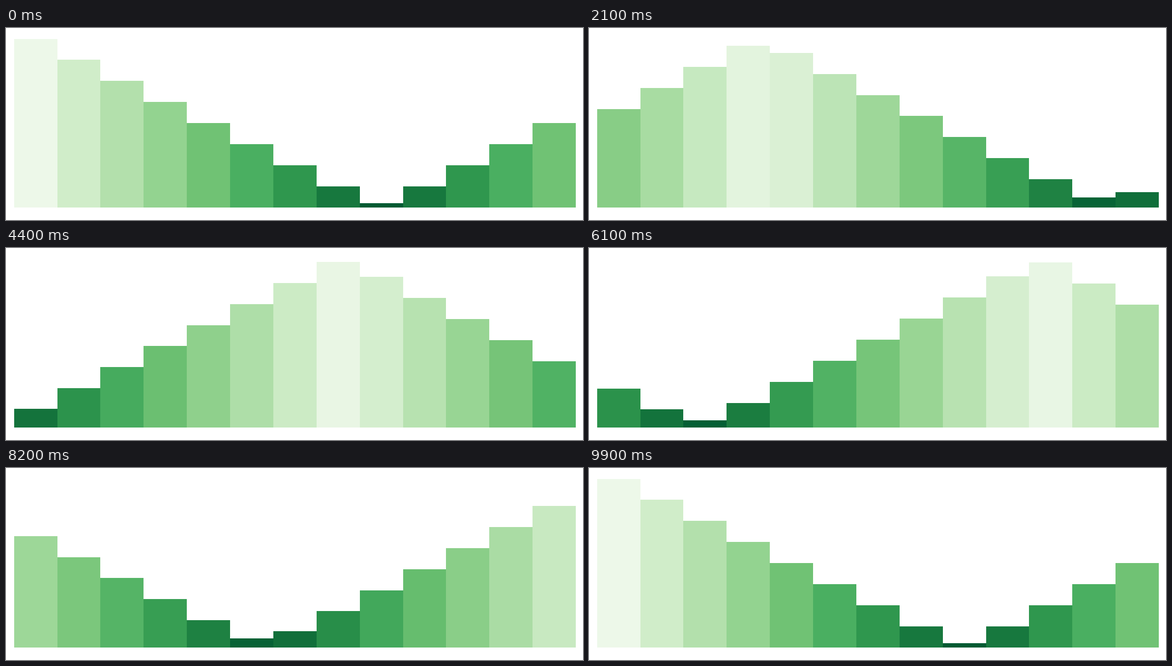
Animation of 1200x400 px, one loop 10 s. Source, as a matplotlib script:

```python
import numpy as np
import matplotlib.pyplot as plt
from matplotlib.animation import FuncAnimation
from matplotlib.colors import to_rgb
from matplotlib.patches import Rectangle

WIDTH, HEIGHT, DPI = 1200, 400, 100
FRAMES, INTERVAL = 100, 100
BARS, STATES = 13, 16
PEAK, FLOOR = 8, 0.2
LEFT, BAR_WIDTH = 16.67, 89.88
BASE, UNIT = 373.73, 43.9

GREENS = ["#005A32", "#238B45", "#41AB5D", "#74C476",
          "#A1D99B", "#C7E9C0", "#EDF8E9"]

RGB_TO_XYZ = np.array([[0.4124564, 0.3575761, 0.1804375],
                       [0.2126729, 0.7151522, 0.0721750],
                       [0.0193339, 0.1191920, 0.9503041]])
WHITE = RGB_TO_XYZ.sum(axis=1)


def rgb_to_lab(rgb):
    rgb = np.asarray(rgb, float)
    linear = np.where(rgb > 0.04045, ((rgb + 0.055) / 1.055) ** 2.4, rgb / 12.92)
    t = linear @ RGB_TO_XYZ.T / WHITE
    f = np.where(t > 0.008856, np.cbrt(t), 7.787 * t + 16 / 116)
    x, y, z = f[..., 0], f[..., 1], f[..., 2]
    return np.stack([116 * y - 16, 500 * (x - y), 200 * (y - z)], axis=-1)


def lab_to_rgb(lab):
    y = (lab[..., 0] + 16) / 116
    f = np.stack([y + lab[..., 1] / 500, y, y - lab[..., 2] / 200], axis=-1)
    t = np.where(f > 0.206893, f ** 3, (f - 16 / 116) / 7.787)
    linear = np.clip((t * WHITE) @ np.linalg.inv(RGB_TO_XYZ).T, 0, 1)
    rgb = np.where(linear > 0.0031308,
                   1.055 * linear ** (1 / 2.4) - 0.055, 12.92 * linear)
    return np.clip(rgb, 0, 1)


RAMP = rgb_to_lab([to_rgb(c) for c in GREENS])
# Each state starts on a whole frame; the last one equals the first.
STARTS = np.round(np.arange(STATES + 1) * (FRAMES - 1) / STATES)


def state_heights(state):
    offset = (np.arange(BARS) - state) % STATES
    return np.maximum(np.abs(offset - PEAK), FLOOR)


def state_colors(heights):
    pos = (heights - FLOOR) / (PEAK - FLOOR) * (len(RAMP) - 1)
    stops = np.arange(len(RAMP))
    return np.stack([np.interp(pos, stops, RAMP[:, k]) for k in range(3)], axis=-1)


def pose(frame):
    """Heights and colours of all bars, linear between two states."""
    phase = np.interp(frame, STARTS, np.arange(STATES + 1))
    state = int(phase)
    mix = phase - state
    a, b = state_heights(state), state_heights(state + 1)
    lab = (1 - mix) * state_colors(a) + mix * state_colors(b)
    return (1 - mix) * a + mix * b, lab_to_rgb(lab)


fig = plt.figure(figsize=(WIDTH / DPI, HEIGHT / DPI), dpi=DPI, facecolor="white")
ax = fig.add_axes([0, 0, 1, 1])
ax.set_xlim(0, WIDTH)
ax.set_ylim(HEIGHT, 0)
ax.axis("off")

edges = np.round(LEFT + BAR_WIDTH * np.arange(BARS + 1))
bottom = round(BASE)
bars = [ax.add_patch(Rectangle((x, bottom), w, 0, linewidth=0, antialiased=False))
        for x, w in zip(edges, np.diff(edges))]


def update(frame):
    heights, colors = pose(frame)
    for bar, top, color in zip(bars, np.round(BASE - UNIT * heights), colors):
        bar.set_y(top)
        bar.set_height(bottom - top)
        bar.set_facecolor(color)
    return bars


anim = FuncAnimation(fig, update, frames=FRAMES, interval=INTERVAL,
                     init_func=lambda: update(0), repeat=True, repeat_delay=0)
plt.show()
```
